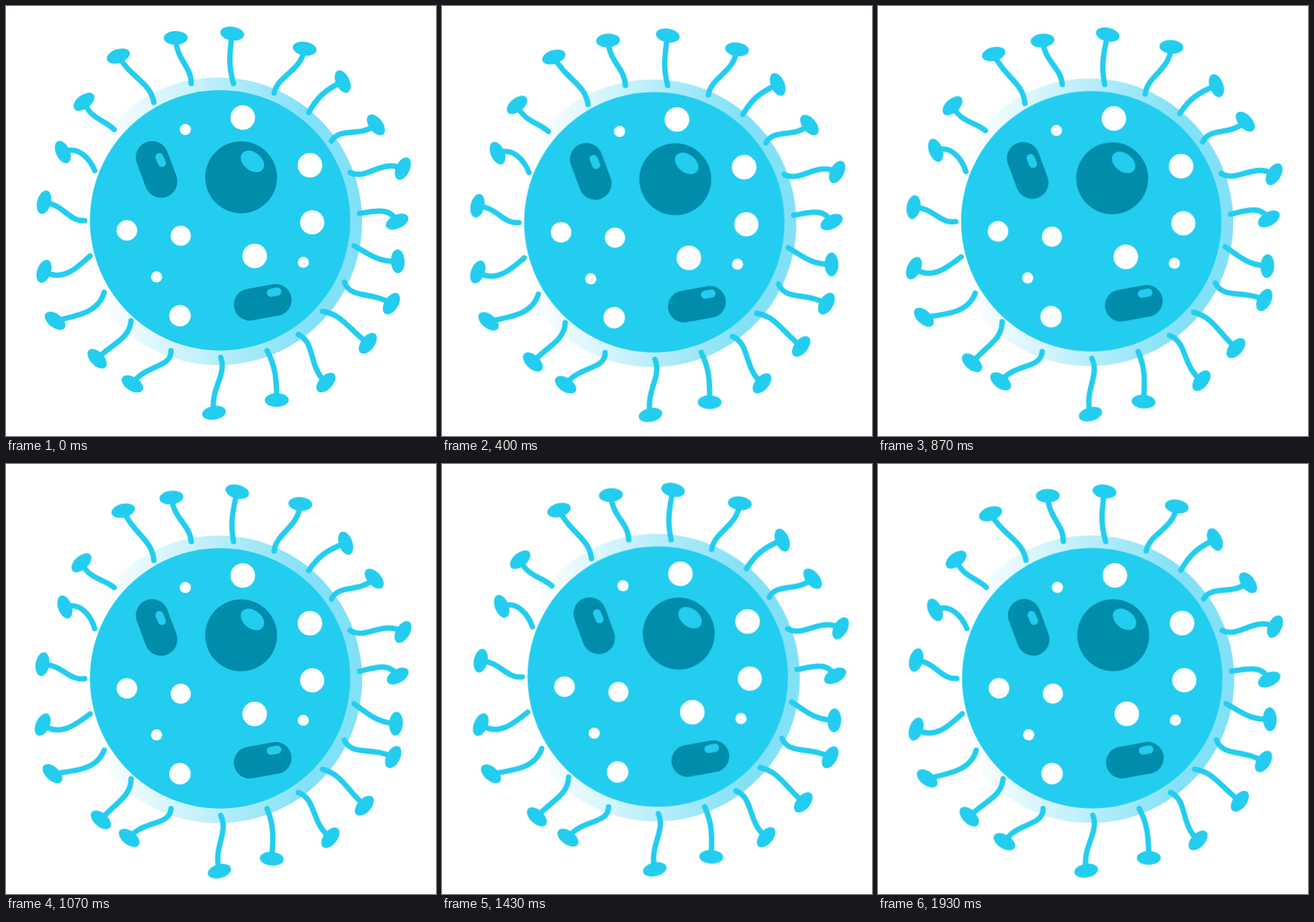
These frames come from a looping animation (640x640 px, 1960 ms). An HTML page:

```html
<!DOCTYPE html>
<html lang="en">
<head>
<meta charset="utf-8">
<title>Floating virus</title>
<style>
  html, body { margin: 0; width: 100%; height: 100%; overflow: hidden; background: #fff; }
  svg { display: block; width: 100%; height: 100%; }

  #virus { animation: drift 980ms linear -445ms infinite alternate; }
  @keyframes drift {
    from { transform: translate(3.1px, -3.2px); }
    to { transform: translate(-3.5px, 3.8px); }
  }

  .spike { animation: swing 980ms cubic-bezier(.35, .17, .65, .83) infinite alternate; }
  .cw { --from: -.2deg; --to: 5.9deg; animation-delay: -1890ms; }
  .ccw { --from: 0deg; --to: -5.9deg; animation-delay: -10ms; }
  @keyframes swing {
    from { transform: rotate(var(--from)); }
    to { transform: rotate(var(--to)); }
  }

  .spike path { fill: none; stroke: #23cdef; stroke-width: 8; stroke-linecap: round; }
  .spike ellipse, .cell { fill: #23cdef; }
  .dark { fill: #008cab; stroke: #008cab; }
  .shine { fill: #23cdef; stroke: #23cdef; }
  .pill { stroke-linecap: round; }
</style>
</head>
<body>
<svg viewBox="0 0 640 640">
  <defs>
    <linearGradient id="glow" gradientUnits="userSpaceOnUse" x1="140" y1="0" x2="450" y2="0">
      <stop offset="0" stop-color="#fff"/>
      <stop offset="1" stop-color="#82e1f7"/>
    </linearGradient>
  </defs>
  <g id="virus">
    <circle cx="316" cy="320.5" r="214" fill="url(#glow)"/>
    <circle class="cell" cx="318.5" cy="319" r="193.7"/>
    <g id="spikes"></g>

    <circle class="dark" cx="349.8" cy="255" r="53.5" stroke="none" stroke-width="0"/>
    <ellipse class="shine" rx="19.5" ry="13.5" stroke-width="0" transform="translate(366.7 231.3) rotate(38)"/>
    <path class="dark pill" stroke-width="48.5" d="M217.3 225.3L230.7 261.3"/>
    <path class="shine pill" stroke-width="12" d="M228.2 224.7L232 233.8"/>
    <path class="dark pill" stroke-width="47.5" d="M362.7 444.5L401.2 437.5"/>
    <path class="shine pill" stroke-width="12" d="M394 426.8L403.7 425"/>
    <g id="spots" fill="#fff"></g>
  </g>
</svg>
<script>
  const rad = Math.PI / 180;

  function add(parent, tag, attrs) {
    const el = document.createElementNS('http://www.w3.org/2000/svg', tag);
    for (const key in attrs) el.setAttribute(key, attrs[key]);
    return parent.appendChild(el);
  }

  // Point at a distance from (x, y) in the direction of an angle in degrees
  const step = (x, y, angle, dist) =>
    `${x + dist * Math.cos(angle * rad)} ${y + dist * Math.sin(angle * rad)}`;

  // base x, y, head x, y, stem angle at the base, head normal, extra bend at the head
  const spikes = [
    [338.5, 115.5, 336.5, 41, -106, 98],
    [399, 129.5, 444.5, 63.5, -78, 100],
    [450.5, 158.5, 501, 112.5, -61, 155],
    [484.5, 201, 550.5, 177, -60, 143],
    [512, 248, 590.5, 242, 25, 205],
    [526, 308.5, 582, 321, -6, -115],
    [518, 357, 583, 380, 28, 178],
    [503.5, 411, 573.5, 443, 70, -148],
    [471, 454.5, 538.5, 502, 8, -143],
    [435, 489, 476, 560.5, 25, -137],
    [388.5, 513, 403, 586.5, 62, -91],
    [319.5, 523, 309.5, 605.5, 70, -100],
    [245.5, 513, 188, 562.5, 88, -58],
    [186, 468.5, 135.5, 525, 95, -44],
    [146, 426, 73, 468.5, 105, -52, 40],
    [125, 372, 56.5, 395, 138, 19, 12],
    [117, 319.5, 56.5, 292, 175, 15, -8],
    [132, 245, 84.5, 217.5, -112, -25],
    [161, 184, 116, 142.5, -135, 53, 17],
    [220, 143.5, 167, 74.5, -100, 71, -12],
    [275.5, 115.5, 252.5, 47.5, -88, 89]
  ];

  const spikeLayer = document.getElementById('spikes');
  spikes.forEach(([bx, by, hx, hy, lean, normal, bend = 0], i) => {
    // Neighbours swing in opposite ways, except for one pair on the left
    const clockwise = i < 15 ? i % 2 === 0 : i % 2 === 1;
    const len = Math.hypot(hx - bx, hy - by);
    const g = add(spikeLayer, 'g', { class: 'spike ' + (clockwise ? 'cw' : 'ccw') });
    g.style.transformOrigin = `${bx}px ${by}px`;
    add(g, 'path', {
      d: `M${bx} ${by}C${step(bx, by, lean, len * .35)} ` +
         `${step(hx, hy, normal + bend, len * .45)} ${hx} ${hy}`
    });
    add(g, 'ellipse', {
      rx: 17.8, ry: 10.2,
      transform: `translate(${hx} ${hy}) rotate(${normal + 90})`
    });
  });

  const spots = [
    [352.3, 166, 18.3], [452.3, 237, 18.3], [455.6, 322, 18], [370, 372, 18.3],
    [260, 342, 15], [179.8, 334, 15.3], [258.8, 461, 16],
    [266.8, 183.8, 8.3], [224, 403.3, 8.3], [442.4, 381.5, 8.3]
  ];
  const spotLayer = document.getElementById('spots');
  for (const [cx, cy, r] of spots) add(spotLayer, 'circle', { cx, cy, r });
</script>
</body>
</html>
```
